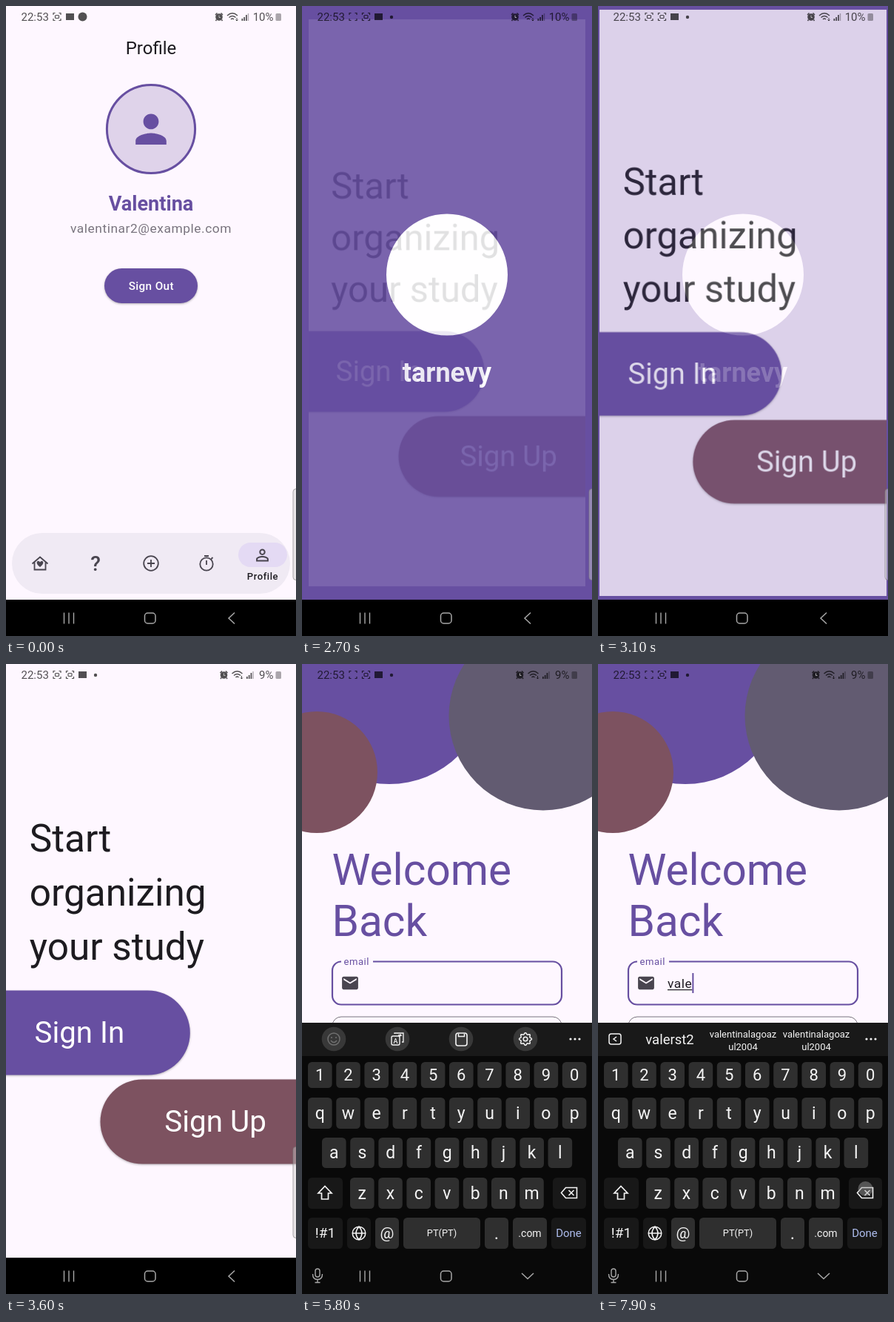
These frames come from a looping animation (392 px wide and 850 px high, 8 s). An HTML page with a canvas:

```html
<!DOCTYPE html>
<html lang="en">
<head>
<meta charset="utf-8">
<style>
html, body { margin: 0; height: 100%; overflow: hidden; background: #000; }
canvas { display: block; }
</style>
</head>
<body>
<canvas id="stage" width="392" height="850"></canvas>
<script>
const screen2d = document.getElementById('stage').getContext('2d');
const layer = Object.assign(document.createElement('canvas'), { width: 392, height: 850 });
const layer2d = layer.getContext('2d');
let c = screen2d;

const BG = '#fef7ff', PURPLE = '#674fa1', BROWN = '#7d5260', GRAY = '#625b71';
const INK = '#1d1b20', ICON = '#49454f', DIM = 'rgba(0,0,0,.68)';
const APP_H = 801;

const clamp = v => Math.max(0, Math.min(1, v));
const mix = (a, b, p) => a + (b - a) * p;
const easeOut = p => 1 - (1 - p) ** 3;

// ---- drawing helpers ----
const circle = (x, y, r) => `M${x - r} ${y}a${r} ${r} 0 1 0 ${2 * r} 0a${r} ${r} 0 1 0 ${-2 * r} 0z`;
const fill = (d, color) => { c.fillStyle = color; c.fill(new Path2D(d), 'evenodd'); };
const line = (d, color, width = 1.5) => {
  c.strokeStyle = color;
  c.lineWidth = width;
  c.stroke(new Path2D(d));
};
const rect = (x, y, w, h, color) => { c.fillStyle = color; c.fillRect(x, y, w, h); };
function box(x, y, w, h, r, { color, stroke, width = 1, shadow } = {}) {
  c.save();
  c.beginPath();
  c.roundRect(x, y, w, h, r);
  if (shadow) {
    c.shadowColor = 'rgba(0,0,0,.3)';
    c.shadowBlur = 3;
    c.shadowOffsetY = 1;
  }
  if (color) { c.fillStyle = color; c.fill(); }
  if (stroke) { c.strokeStyle = stroke; c.lineWidth = width; c.stroke(); }
  c.restore();
}
function text(str, x, y, size, color, { weight = 400, align = 'left', spacing = 0 } = {}) {
  c.font = `${weight} ${size}px Roboto, sans-serif`;
  c.letterSpacing = spacing + 'px';
  c.textAlign = align;
  c.fillStyle = color;
  c.fillText(str, x, y);
  return c.measureText(str).width;
}
// Icon drawn on a 24-unit grid, centred on x, y.
function icon(d, x, y, scale, color) {
  c.save();
  c.translate(x - 12 * scale, y - 12 * scale);
  c.scale(scale, scale);
  fill(d, color);
  c.restore();
}
function ripple(t, start, x, y, [bx, by, w, h, r]) {
  if (t < start) return;
  c.save();
  c.beginPath();
  c.roundRect(bx, by, w, h, r);
  c.clip();
  fill(circle(x, y, 30 + w * clamp((t - start) / 300)), 'rgba(255,255,255,.12)');
  c.restore();
}

const PERSON = 'M12 12c2.21 0 4-1.79 4-4s-1.79-4-4-4-4 1.79-4 4 1.79 4 4 4zm0 2c-2.67 0-8 1.34-8 4v2h16v-2c0-2.66-5.33-4-8-4z';
const PERSON_LINE = 'M12 5.9a2.1 2.1 0 1 1 0 4.2 2.1 2.1 0 0 1 0-4.2m0 9c2.97 0 6.1 1.46 6.1 2.1v1.1H5.9V17c0-.64 3.13-2.1 6.1-2.1M12 4C9.8 4 8 5.8 8 8s1.8 4 4 4 4-1.8 4-4-1.8-4-4-4zm0 9c-2.67 0-8 1.34-8 4v3h16v-3c0-2.66-5.33-4-8-4z';
const MAIL = 'M20 4H4c-1.1 0-2 .9-2 2v12c0 1.1.9 2 2 2h16c1.1 0 2-.9 2-2V6c0-1.1-.9-2-2-2zm0 4l-8 5-8-5V6l8 5 8-5v2z';
const LOCK = 'M18 8h-1V6c0-2.76-2.24-5-5-5S7 3.24 7 6v2H6c-1.1 0-2 .9-2 2v10c0 1.1.9 2 2 2h12c1.1 0 2-.9 2-2V10c0-1.1-.9-2-2-2zm-6 9c-1.1 0-2-.9-2-2s.9-2 2-2 2 .9 2 2-.9 2-2 2zm3.1-9H8.9V6a3.1 3.1 0 0 1 6.2 0v2z';
const HEART = 'M46 757c-7-5-4-9-1.8-8q1.2.3 1.8 1.5q.6-1.2 1.8-1.5c2.2-1 5.2 3-1.8 8z';

// ---- pages ----
function profilePage(t) {
  rect(0, 0, 392, APP_H, BG);
  const mid = { align: 'center' };
  text('Profile', 196, 64.5, 24, INK, mid);
  fill(circle(196, 166, 60), '#dfd3ea');
  line(circle(196, 166, 59.6), PURPLE, 3);
  icon(PERSON, 196, 166.3, 2.6, PURPLE);
  text('Valentina', 196, 276, 27.1, PURPLE, { ...mid, weight: 700 });
  text('valentinar2@example.com', 196, 306, 17.4, '#79747e', { ...mid, spacing: .54 });
  const button = [133, 354, 126, 47, 23.5];
  box(...button, { color: PURPLE, shadow: true });
  ripple(t, 100, 196, 378, button);
  text('Sign Out', 196.3, 383, 15.25, '#fff', { ...mid, weight: 500, spacing: .4 });

  box(8, 711, 376, 82, 41, { color: '#f0eaf4' });
  line('M35.5 752.5L46 743.5l10.5 9M38.5 750.5V760.5h15v-10', ICON, 1.8);
  fill(HEART, ICON);
  text('?', 121, 762, 28, ICON, { ...mid, weight: 500 });
  line(circle(196, 752, 9.8) + 'M191 752h10M196 747v10', ICON, 1.8);
  line(circle(271, 753, 8.7) + 'M268 742h6M271 748v6M277.5 746l2-2', ICON, 1.8);
  box(314, 724, 66, 33, 16.5, { color: '#e4daf4' });
  icon(PERSON_LINE, 346.5, 741, 1.05, ICON);
  text('Profile', 347, 774, 13.07, INK, { ...mid, weight: 500, spacing: .54 });
}

function splashPage() {
  rect(0, 0, 392, APP_H, PURPLE);
  fill(circle(196, 362.5, 82), '#fff');
  text('tarnevy', 196, 507, 36, '#fff', { weight: 700, align: 'center' });
}

function startPage(t) {
  rect(0, 0, 392, APP_H, BG);
  ['Start', 'organizing', 'your study'].forEach((s, i) => text(s, 31.8, 252.8 + 73 * i, 51.3, INK));
  const signIn = [-60, 440.5, 308.8, 114, 57];
  box(...signIn, { color: PURPLE, shadow: true });
  ripple(t, 4100, 120, 497, signIn);
  box(127.5, 560.5, 330, 114, 57, { color: BROWN, shadow: true });
  text('Sign In', 38.6, 510.5, 40.2, '#fff');
  text('Sign Up', 214.3, 630.5, 40.4, '#fff');
}

function loginPage(t) {
  const focused = t >= 5300;
  rect(0, 0, 392, APP_H, BG);
  c.save();
  c.translate(0, -12 * slideUp(t));
  rect(0, -20, 100, 60, PURPLE);
  fill(circle(118, 41, 133), PURPLE);
  fill(circle(326, 82, 127.5), GRAY);
  fill(circle(20, 158, 82), BROWN);
  text('Welcome', 40.5, 310, 58.5, PURPLE);
  text('Back', 40.5, 379, 58.5, PURPLE);

  box(41, 413.5, 310, 58, 12, focused ? { stroke: PURPLE, width: 2.2 } : { stroke: '#79747e' });
  icon(MAIL, 65, 442.5, 1.09, ICON);
  const lift = easeOut(clamp((t - 5250) / 250));
  if (lift > .5) rect(53, 411, 43, 5, BG);
  text('email', mix(94, 56.5, lift), mix(449, 418, lift), mix(17.4, 13.07, lift),
    focused ? PURPLE : ICON, { spacing: .54 });
  const typed = typedText(t);
  if (typed) {
    const w = text(typed, 94, 448.5, 17.4, INK, { spacing: .54 });
    rect(94, 451, w, 1.2, INK);
    rect(94 + w, 429, 2, 27, PURPLE);
  } else if (t >= 6100) rect(94, 429, 2, 27, PURPLE);

  box(41, 488, 310, 58, 12, { stroke: '#79747e' });
  icon(LOCK, 65, 516.5, 1.09, ICON);
  text('password', 94, 523, 17.4, ICON, { spacing: .54 });
  box(41, 567, 310, 51, 12, { color: PURPLE, shadow: true });
  text('Sign In', 196.3, 599, 17.4, '#fff', { weight: 700, align: 'center', spacing: .2 });
  text("Don't have an account?", 82, 655, 15.25, INK, { spacing: .43 });
  text('Sign Up', 253, 655, 15.25, BROWN, { weight: 700, spacing: .43 });
  box(104, 766, 184, 42, 21, { color: '#f7f2fa', shadow: true });
  text('Sign in with Noplue', 196.3, 791, 15.25, PURPLE, { weight: 500, align: 'center', spacing: .35 });
  c.restore();
}

// ---- keyboard ----
const KEY = '#2f2f2f', DARK_KEY = '#181818', WHITE = '#f4f4f4';
const keys = [
  ['1234567890', 8, 537, 35], ['qwertyuiop', 8, 585, 42], ['asdfghjkl', 27, 639, 41], ['zxcvbnm', 65, 693, 42],
].flatMap(([row, x, y, h], r) => [...row].map((label, i) =>
  ({ label, x: x + 38.2 * i, y, w: 32.6, h, size: r ? 23 : 22, color: KEY })));
for (const [label, x, y, w, size, color] of [
  ['', 8, 693, 47, 0, DARK_KEY], ['⌫', 339, 693, 45, 0, DARK_KEY], ['!#1', 8, 747, 47, 19, DARK_KEY],
  ['', 61, 747, 32, 0, DARK_KEY], ['@', 99, 747, 32, 21, KEY], ['PT(PT)', 137, 747, 104, 12.8, KEY],
  ['.', 247, 747, 32, 24, KEY], ['.com', 285, 747, 46, 14, KEY], ['Done', 337, 747, 47, 15, DARK_KEY],
]) keys.push({ label, x, y, w, h: 42, size, color });

const keyPresses = [[6100, 'v'], [6600, 'a'], [7100, 'l'], [7500, 'e'], [7900, '⌫']];
const typedText = t => keyPresses.filter(([at, k]) => k !== '⌫' && t >= at + 100).map(p => p[1]).join('');
const slideUp = t => easeOut(clamp((t - 5300) / 480));

function toolbar(t) {
  rect(0, 484, 392, 45, '#191919');
  for (const x of [363, 369, 375]) fill(circle(x, 506, 1.6), WHITE);
  const typed = typedText(t);
  if (typed) {
    box(15, 499, 16, 14, 3, { stroke: WHITE, width: 1.5 });
    line('M25 503l-4 3 4 3', WHITE);
    const mid = { align: 'center' };
    text(typed + 'rst2', 97, 513, 18.5, WHITE, mid);
    for (const x of [196, 295]) {
      text('valentinalagoaz', x, 504, 13, WHITE, mid);
      text('ul2004', x, 521, 13, WHITE, mid);
    }
    return;
  }
  [43, 129, 215, 302].forEach(x => fill(circle(x, 506, 16.3), '#383838'));
  line(circle(43, 506, 8) + 'M39 508q4 5 8 0', '#707070');
  fill(circle(40, 504, 1) + circle(46, 504, 1), '#707070');
  box(121, 502, 11, 12, 2, { stroke: WHITE, width: 1.4 });
  line('M125 499v-1h12v12h-2M130 501h4l-1.5-1.5M133.5 501l-1.5 1.5', WHITE, 1.3);
  text('A', 126.5, 511.5, 9, WHITE, { align: 'center', weight: 500 });
  box(208, 498, 15, 17, 3, { stroke: WHITE, width: 1.6 });
  line('M211.5 499v3.5h8v-3.5', WHITE);
  line(circle(302, 506, 2.8), WHITE);
  let gear = '';
  for (let i = 0; i < 48; i++) {
    const a = i / 48 * 2 * Math.PI, r = 7.4 + 1.1 * Math.cos(8 * a);
    gear += `${i ? 'L' : 'M'}${302 + r * Math.cos(a)} ${506 + r * Math.sin(a)}`;
  }
  line(gear + 'z', WHITE);
}

function keyboard(t) {
  c.save();
  c.translate(0, 366 * (1 - slideUp(t)));
  rect(0, 484, 392, 366, '#090909');
  toolbar(t);
  for (const k of keys) {
    box(k.x, k.y, k.w, k.h, 5.5, { color: k.color });
    text(k.label, k.x + k.w / 2, k.y + k.h / 2 + k.size * .34, k.size,
      k.label === 'Done' ? '#aebdee' : WHITE, { align: 'center' });
  }
  line('M31 704.5l9 9.5h-4.5v8h-9v-8H22z', WHITE, 1.7);
  line('M350.5 713.5l6-7h15v14h-15zM360.5 710l7 7M367.5 710l-7 7', WHITE, 1.6);
  line(circle(77, 768, 8.8) + 'M68.5 768h17M77 759q-8 9 0 18q8-9 0-18', WHITE, 1.5);
  c.restore();
}

// ---- system bars ----
const recordToggles = [2100, 3000, 4100, 5100, 5500, 6500, 7100];

function recordIcon(x, lit) {
  line(`M${x - 5} 12v-2.5h2.5M${x + 2.5} 9.5h2.5v2.5M${x + 5} 17v2.5h-2.5M${x - 2.5} 19.5h-2.5v-2.5`, DIM, 1.2);
  if (lit) box(x - 2.5, 12.5, 5, 4, 1, { stroke: DIM, width: 1.2 });
}

function statusBar(t) {
  text('22:53', 20.5, 20, 15, DIM);
  const lit = recordToggles.filter(at => t >= at).length % 2 === 0;
  recordIcon(69, lit);
  if (t < 200) {
    rect(81, 10, 11, 9, DIM);
    fill(circle(103.5, 14.5, 6), DIM);
  } else {
    recordIcon(86.5, true);
    rect(98, 10, 11, 9, DIM);
    fill(circle(121, 15, 2.2), DIM);
  }
  const low = t >= 3500, x = low ? 6.5 : 0;
  text(low ? '9%' : '10%', 361.5, 20, 15, DIM, { align: 'right' });
  box(364.5, 10, 7.5, 10, 1.5, { color: 'rgba(0,0,0,.33)' });
  c.save();
  c.translate(x, 0);
  fill(circle(288, 15, 4.8), DIM);
  line('M283 12l2.5-2.5M293 12l-2.5-2.5M284.5 18.5l-1 1.5M291.5 18.5l1 1.5', DIM, 1.5);
  line('M288 12.5v3h2', 'rgba(255,255,255,.6)', 1);
  line('M299 13q7-6.5 14 0M301.5 15.5q4.5-4 9 0M304 18q2-2 4 0', DIM, 1.4);
  line('M312 16v4M310.5 18.5l1.5 1.5 1.5-1.5', DIM, 1);
  [3, 5, 8].forEach((h, i) => rect(318.5 + 2.8 * i, 20 - h, 1.7, h, DIM));
  rect(326.8, 10, 1.4, 10, 'rgba(0,0,0,.3)');
  c.restore();
}

function navBar(t) {
  const open = t >= 5400, color = '#a8a8a8';
  rect(0, APP_H, 392, 49, open ? '#090909' : '#000');
  line('M78.5 818.5v15M85 818.5v15M91.5 818.5v15', color, 1.4);
  box(187.5, 819, 14.5, 14, 4, { stroke: color, width: 1.5 });
  line(open ? 'M297 822l8 7.5 8-7.5' : 'M309 818.5l-8 7.5 8 7.5', color, 1.5);
  if (open) {
    box(18, 816, 6, 11, 3, { stroke: color, width: 1.4 });
    line('M14.5 823q0 7.5 6.5 7.5t6.5-7.5M21 830.5v4M17.5 834.5h7', color, 1.4);
  }
}

function touches(t) {
  const taps = [[100, 196, 378], [4100, 120, 497], [5300, 190, 440]];
  for (const [at, label] of keyPresses) {
    const k = keys.find(key => key.label === label);
    taps.push([at, k.x + k.w / 2, label === '⌫' ? 708 : k.y + k.h / 2]);
  }
  for (const [at, x, y] of taps)
    if (t >= at && t < at + 200) fill(circle(x, y, 10), 'rgba(160,160,160,.45)');
}

// ---- page changes: each new page fades in while growing to full size ----
const pages = [
  { draw: profilePage, start: -2000, length: 960 },
  { draw: splashPage, start: 340, length: 960 },
  { draw: startPage, start: 2560, length: 960 },
  { draw: loginPage, start: 4330, length: 370 },
];

function showPage(page, t) {
  const p = clamp((t - page.start) / page.length);
  if (p === 0) return;
  if (p === 1) return page.draw(t);
  c = layer2d;
  c.clearRect(0, 0, 392, 850);
  page.draw(t);
  c = screen2d;
  const scale = 1 - .062 * (1 - p) ** 2;
  c.save();
  c.beginPath();
  c.rect(0, 0, 392, APP_H);
  c.clip();
  c.globalAlpha = clamp((p - .063) / .64);
  c.translate(196, APP_H / 2);
  c.scale(scale, scale);
  c.drawImage(layer, 0, 0, 392, APP_H, -196, -APP_H / 2, 392, APP_H);
  c.restore();
}

function frame() {
  const t = Math.floor(performance.now() % 8000 / 100) * 100;
  pages.forEach(page => showPage(page, t));
  box(388, 651.5, 12, 123, 4, { color: 'rgba(205,205,205,.45)', stroke: 'rgba(120,120,120,.6)' });
  statusBar(t);
  if (t >= 5300) keyboard(t);
  navBar(t);
  touches(t);
  requestAnimationFrame(frame);
}
frame();
</script>
</body>
</html>
```
